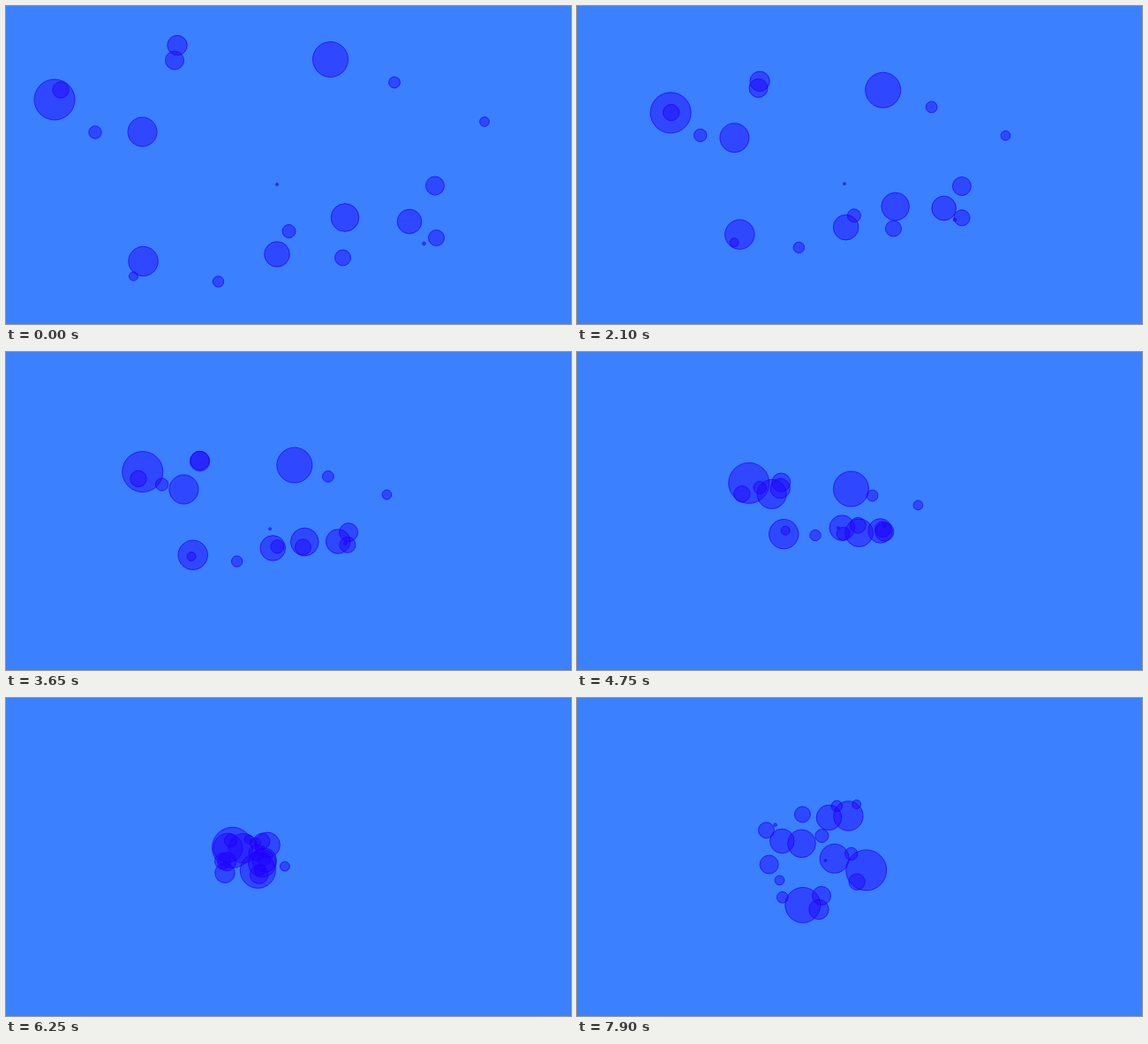
These frames come from a looping animation (640x360 px, 8 s). An HTML page with a canvas:

```html
<!DOCTYPE html>
<html lang="en">
<head>
<meta charset="utf-8">
<title>Circles pulling together</title>
<style>
  html, body { margin: 0; width: 100%; height: 100%; overflow: hidden; background: #3a80ff; }
  canvas { display: block; }
</style>
</head>
<body>
<canvas id="stage" width="640" height="360"></canvas>
<script>
const ctx = document.getElementById('stage').getContext('2d');
const LOOP = 8000, STEP = 50, LAST = 158;

// Every circle pulls every other one with a force that does not depend on
// distance; its mass is its radius. They have been falling for LEAD steps.
const PULL = 5.8e-5, LEAD = 104, SUBSTEPS = 4;

// Starting scene: x, y, radius
const bodies = [
  [55, 106, 23], [62, 95, 9.2], [194, 44.5, 11.2], [191, 61.5, 10.5],
  [154.5, 142.5, 16.5], [155.5, 289, 16.7], [101, 143, 7.2], [144.5, 306, 5],
  [240.5, 312, 6.2], [307, 281, 14.3], [320.5, 255, 7.5], [381.5, 285, 9],
  [384, 239.5, 15.8], [457, 244, 13.8], [487.5, 262.5, 9], [473.5, 269, 1.8],
  [486, 203.5, 10.5], [542, 131, 5.4], [440, 86.5, 6.4], [307, 202, 1.4],
  [367.5, 60.5, 20]
].map(([x, y, r]) => ({ x, y, r, vx: 0, vy: 0 }));

function accelerate(dt) {
  for (const a of bodies) {
    for (const b of bodies) {
      const dx = b.x - a.x, dy = b.y - a.y;
      const k = PULL * b.r * dt / (Math.hypot(dx, dy) || 1);
      a.vx += k * dx;
      a.vy += k * dy;
    }
  }
}

function move(dt) {
  for (const b of bodies) {
    b.x += b.vx * dt;
    b.y += b.vy * dt;
  }
}

// Work out the whole fall once, so that drawing depends on the time alone
const poses = [];
accelerate(LEAD);
for (let i = 0; i <= LAST; i++) {
  poses.push(bodies.map(({ x, y, r }) => ({ x, y, r })));
  for (let j = 0; j < SUBSTEPS; j++) {
    accelerate(1 / SUBSTEPS);
    move(1 / SUBSTEPS);
  }
}

function draw(ms) {
  const step = Math.min(LAST, Math.floor((ms % LOOP) / STEP));
  ctx.fillStyle = '#3a80ff';
  ctx.fillRect(0, 0, 640, 360);
  ctx.fillStyle = 'rgba(32, 0, 255, 0.44)';
  ctx.strokeStyle = 'rgba(32, 0, 240, 0.7)';
  for (const { x, y, r } of poses[step]) {
    ctx.beginPath();
    ctx.arc(x, y, r, 0, Math.PI * 2);
    ctx.fill();
    ctx.stroke();
  }
}

const start = performance.now();
function tick() {
  draw(performance.now() - start);
  requestAnimationFrame(tick);
}
tick();
</script>
</body>
</html>
```
